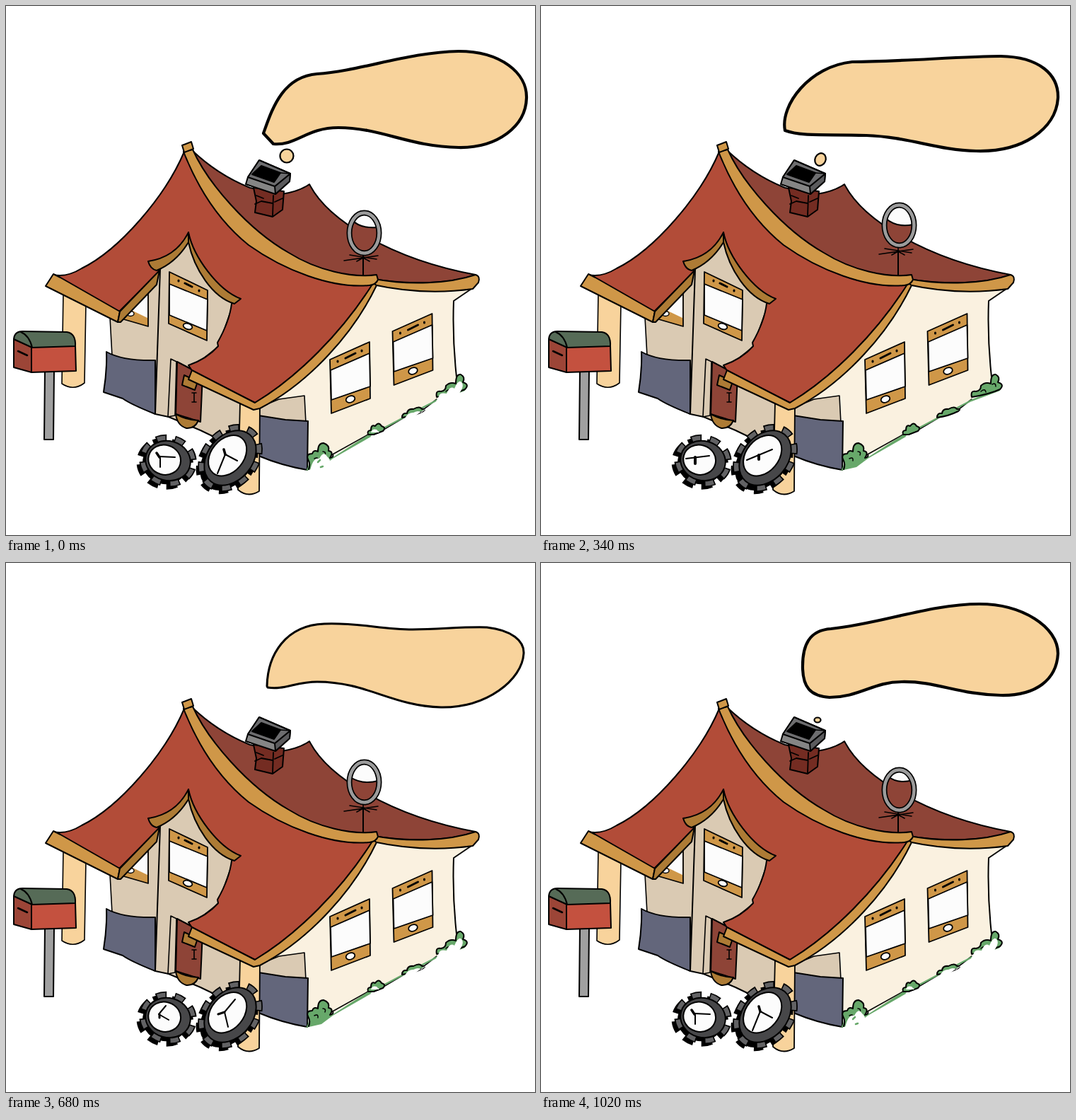
Animation of 748x748 px, one loop 1190 ms. Source, as an HTML page:

```html
<!DOCTYPE html>
<html lang="en">
<head>
<meta charset="utf-8">
<title>Clockwork house</title>
<style>
  html, body { margin: 0; width: 100%; height: 100%; overflow: hidden; background: #fff; }
  svg { display: block; width: 100%; height: 100%; stroke: #000; stroke-width: 2; stroke-linejoin: round; stroke-linecap: round; fill: none; }
  .red { fill: #b24c38; } .dark { fill: #8e4437; } .gold { fill: #cf9748; } .ochre { fill: #ad7b35; }
  .beige { fill: #dacab3; } .cream { fill: #faf1e0; } .blue { fill: #63667b; } .peach { fill: #f8d39c; }
  .white { fill: #fcfcfc; } .bare { stroke: none; }
  .smoke { stroke-width: 4.2; fill: #f8d39c; }
  .puff { fill: #f8d39c; stroke-width: 2.2; }
  .leaf { fill: #67a86a; }
  .hole { fill: #fff; stroke: none; }
  .fringe { stroke: #67a86a; stroke-width: 2.5; }
  .pose { visibility: hidden; animation: show 1190ms step-end infinite; animation-delay: calc((var(--i) - 7) * 170ms); }
  @keyframes show { 0% { visibility: visible; } 14.2857% { visibility: hidden; } }
</style>
</head>
<body>
<svg viewBox="0 0 748 748">
<defs>
  <g id="rimWide">
    <circle cx="506" cy="310" r="28.5" stroke-width="7.5"/>
    <circle cx="506" cy="310" r="28.5" stroke="#9b9b9b" stroke-width="4"/>
  </g>
  <g id="rimThin">
    <ellipse cx="506.5" cy="310" rx="21" ry="28.5" stroke-width="8"/>
    <ellipse cx="506.5" cy="310" rx="21" ry="28.5" stroke="#9b9b9b" stroke-width="4.6"/>
  </g>
  <circle id="discWide" class="dark bare" cx="506" cy="310" r="28"/>
  <ellipse id="discThin" class="dark bare" cx="506.5" cy="310" rx="21" ry="28"/>
  <path id="legs" stroke-width="1.6" d="M478 351L526 344M486 343L524 349M496 352L505 347L514 352M505 341V349"/>

  <g id="hands0">
    <path d="M217 637L239 638M218 637V652M310 634L299 661M310 634L327 643"/>
    <path d="M217 638L213 632M310 634L308 627" stroke-width="3.5"/>
  </g>
  <g id="hands1">
    <path d="M216 638L226 626M216 638L230 646M309 635L324 617M309 635L314 656"/>
    <path d="M217 638V643M309 635L300 638" stroke-width="3"/>
  </g>
  <g id="hands2">
    <path d="M205 640L238 636M291 642L327 627"/>
    <path d="M218 638V647M308 635V641" stroke-width="4"/>
  </g>

  <g id="cornerFull">
    <path class="leaf bare" d="M424 657Q430 648 427 641Q424 633 433 633Q435 627 441 630Q441 618 449 618Q458 621 456 629Q464 630 458 639L464 637L514 605L516 609L462 640L446 652Z"/>
    <path d="M428 655Q431 648 427 641Q424 633 433 633Q435 627 441 630Q441 618 449 618Q458 621 456 629Q464 630 458 639Q464 638 462 634"/>
    <path d="M436 640Q442 637 441 643M448 630Q453 630 451 635" stroke-width="1.5"/>
  </g>
  <g id="cornerBare">
    <use href="#cornerFull"/>
    <path class="hole" d="M430 657Q434 638 443 640Q449 628 454 637Q459 641 458 647L446 660Z"/>
    <path class="fringe" d="M445 652L448 651M441 645L444 642"/>
  </g>
  <g id="restFull">
    <path class="fringe" d="M515 607L562 582L608 558L648 543" stroke-width="4"/>
    <path class="leaf" d="M512 606Q510 600 516 600Q516 591 522 594Q527 587 531 594Q538 596 533 601L520 606ZM560 582Q560 575 567 576Q568 569 576 570Q585 565 588 570Q595 569 590 573Q576 580 560 582Z"/>
    <path class="leaf" d="M609 553Q607 543 615 545Q622 544 622 537Q628 531 636 534Q636 520 643 521Q650 525 646 532Q656 535 649 542Q634 549 609 553Z"/>
    <path d="M622 545Q628 540 629 546M638 535Q643 532 643 538" stroke-width="1.5"/>
  </g>
  <g id="restBare">
    <use href="#restFull"/>
    <path class="hole" d="M612 552Q613 546 623 548Q628 536 634 541Q640 527 644 532Q649 537 640 549L622 560L606 563ZM563 585Q568 574 576 575Q584 571 587 575L591 572L604 562L578 580ZM516 603Q518 597 524 599L528 603Z"/>
  </g>
</defs>

<!-- walls -->
<path class="peach" stroke-width="1.6" d="M81 405L79 534Q95 545 111 533L113 420Z"/>
<path class="beige" stroke-width="1.6" d="M147 440L150 495L211 577L219 370L180 400Z"/>
<path class="blue" d="M142 489Q165 502 211 501L211 577Q176 563 165 555L138 546Q143 515 142 489Z"/>
<path class="beige" d="M218 372L258 328L322 420L300 482L262 512L277 520L331 556V616L300 612L275 600L230 581L211 577Z"/>
<path class="beige" stroke-width="1.6" d="M262 513L233 499L229 581L239 579L241 503"/>
<path class="dark" d="M242 503L278 522L275 588L240 577Z"/>
<path class="ochre" d="M240 577Q257 586 272 586Q267 598 255 597Q242 593 240 577ZM252 522L271 531L267 543L249 536Z"/>
<path d="M266 547V560M263 547H269M263 560H269" stroke-width="1.6"/>
<path class="cream bare" d="M523 392Q590 409 658 400L633 417L637 540L428 655L423 550L357 570Z"/>
<path d="M658 400L633 417Q631 470 637 524"/>
<path class="beige" stroke-width="1.6" d="M357 568L386 556L422 551L424 590H357Z"/>
<path class="blue" d="M357 579L395 585L427 587L426 656Q390 650 357 636Z"/>
<path class="peach" stroke-width="1.8" d="M331 560L328 684Q342 696 358 686L359 560Z"/>
<path d="M460 635L512 606M534 599L561 583M591 570L609 556" stroke-width="1.6"/>

<!-- windows -->
<g stroke-width="1.8">
  <path class="gold" d="M163 442L201 403V453Z"/>
  <path class="white bare" d="M181 424L200 405V441L177 430Z"/>
  <ellipse class="white" cx="176" cy="435" rx="5" ry="3.5" stroke-width="1.4"/>
  <path class="gold" d="M231 376L285 402L284 473L230 449Z"/>
  <path class="white" d="M231 393L285 415L284 459L231 437Z"/>
  <ellipse class="white" cx="257" cy="453" rx="6.5" ry="4" transform="rotate(18 257 453)"/>
  <path d="M244 388V389M253 392L263 397M273 402V403" stroke-width="3"/>
  <g id="pane">
    <path class="gold" d="M458 500L514 475L515 555L460 576Z"/>
    <path class="white" d="M459 515L514 491L515 538L460 557Z"/>
    <ellipse class="white" cx="487" cy="556" rx="6.5" ry="4.5" transform="rotate(-20 487 556)"/>
    <path d="M469 502V503M480 498L494 491M503 487V488" stroke-width="3"/>
  </g>
  <use href="#pane" x="88.500" y="-40"/>
</g>

<!-- back roof -->
<path class="dark" d="M262 203C290 230 320 247 345 257L390 266Q415 262 429 252C455 303 545 358 664 380C630 394 570 393 524 387C410 405 275 320 256 206Z"/>
<path class="gold" d="M521 386C570 395 625 393 664 380Q671 382 668 391L660 400C610 407 560 403 519 394Z"/>
<path d="M505 349V381"/>

<!-- chimney -->
<path fill="#742c22" d="M350 257L393 262L391 288L377 298L352 292L354 276Z"/>
<path d="M377 297L378 268M354 268L364 272M352 280L361 276L377 279M380 277L391 272" stroke-width="1.8"/>
<path fill="#858585" d="M358 218L402 237L401 248L381 266L339 252L342 242Z"/>
<path fill="#5b5b5d" d="M402 237L401 248L381 266L380 255Z"/>
<path fill="#6d6d6f" d="M358 218L402 237L380 255L342 242Z"/>
<path fill="#000" d="M361 226L388 236L379 249L348 238Z"/>
<path d="M388 236L402 237" stroke-width="1.6"/>

<!-- front roof -->
<path class="red" d="M252 206C225 270 160 345 107 371Q86 384 67 380L78 386L160 432L217 375L203 362Q240 355 258 322C265 355 300 402 330 414L319 421Q316 446 299 476L300 481Q284 499 258 508L264 517L352 561C412 525 475 462 520 392C395 400 310 310 252 206Z"/>
<path class="gold" d="M67 379L56 396L158 447L161 432L77 384Z"/>
<path class="ochre" d="M161 432L158 447L162 447L213 394L217 374Z"/>
<path class="ochre" d="M201 361C228 357 247 342 258 320V334C246 354 230 367 213 374Q204 372 201 361Z"/>
<path class="ochre" d="M258 320C265 355 300 402 332 414L323 421C292 412 266 372 258 334Z"/>
<path class="gold" d="M263 515L258 528L350 571L359 569C430 532 492 462 524 395L519 392C475 462 412 525 352 561Z"/>
<path class="gold" d="M264 203C285 250 342 316 400 349C440 374 490 385 524 380L526 387Q523 394 514 395C460 400 392 373 343 338C302 305 273 262 251 206Z"/>
<path class="gold" d="M249 197L262 192L265 202L252 207Z"/>

<!-- mailbox -->
<path fill="#a0a0a0" d="M55 515L54 613H67L68 515Z"/>
<path fill="#c4513f" d="M36 482L98 480L99 516L36 518Z"/>
<path fill="#9c4537" d="M11 471L36 482V518L11 511Z"/>
<path fill="#566b57" d="M11 471Q12 460 23 460L86 461Q99 463 98 481L37 483Z"/>
<path d="M21 461Q33 466 37 483"/>
<path d="M17 488L30 494" stroke-width="2.5"/>

<!-- gears -->
<g transform="translate(229 643) rotate(15)" stroke-linecap="butt">
  <g transform="translate(-3 5)">
    <ellipse rx="31" ry="28" fill="#000"/>
    <ellipse rx="34" ry="30" pathLength="80" stroke-width="13" stroke-dasharray="5.600 4.400" stroke-dashoffset="-.5"/>
  </g>
  <ellipse rx="34" ry="30" pathLength="80" stroke-width="14" stroke-dasharray="5.600 4.400" stroke-dashoffset="-.5"/>
  <ellipse rx="34" ry="30" pathLength="80" stroke="#626264" stroke-width="10.500" stroke-dasharray="4.400 5.600" stroke-dashoffset="-1.100"/>
  <ellipse rx="32" ry="28" fill="#474749"/>
  <ellipse class="white" cx="-5" cy="0" rx="23" ry="21"/>
</g>
<g transform="translate(317 639) rotate(-50)" stroke-linecap="butt">
  <g transform="translate(-7 0)">
    <ellipse rx="44" ry="32" fill="#000"/>
    <ellipse rx="44" ry="33" pathLength="100" stroke-width="12" stroke-dasharray="5 5" stroke-dashoffset="2.500"/>
  </g>
  <ellipse rx="46" ry="34" pathLength="100" stroke-width="13" stroke-dasharray="5.600 4.400" stroke-dashoffset="2.800"/>
  <ellipse rx="46" ry="34" pathLength="100" stroke="#626264" stroke-width="9.500" stroke-dasharray="4.400 5.600" stroke-dashoffset="2.200"/>
  <ellipse rx="43" ry="31.500" fill="#474749"/>
  <ellipse class="white" cx="0" cy="-5" rx="32" ry="23"/>
</g>

<!-- poses -->
<g class="pose" style="--i:0">
  <path class="smoke" d="M364 180C376 147 390 100 440 96C500 92 570 65 640 64C700 64 737 95 736 130C735 170 695 201 640 200C570 199 530 172 470 172C425 172 410 198 378 195Z"/>
  <circle class="puff" cx="397" cy="212" r="9.500"/>
  <use href="#legs" y="9"/><use href="#discThin" y="11"/>
  <path class="white" d="M489 302Q500 315 525 313L518 294H496Z"/>
  <use href="#rimThin" y="11"/><use href="#hands0"/><use href="#cornerBare"/><use href="#restBare"/>
</g>
<g class="pose" style="--i:1">
  <path class="smoke" d="M330 167C333 120 365 70 412 70C460 73 490 84 560 83C620 82 630 79 665 80C710 84 737 108 735 138C733 178 680 206 610 206C530 206 480 190 420 193C395 194 375 195 360 194Q340 192 338 181Z"/>
  <use href="#legs"/><use href="#discWide"/>
  <path class="white" d="M481 299Q500 319 533 314A28 28 0 0 0 481 299Z"/>
  <use href="#rimWide"/><use href="#hands1"/><use href="#cornerFull"/><use href="#restFull"/>
</g>
<g class="pose" style="--i:2">
  <path class="smoke" d="M345 176C338 140 380 85 440 79C500 79 600 71 650 71C705 72 732 97 731 130C728 175 680 207 615 205C560 204 520 185 460 183C400 181 370 185 345 176Z"/>
  <ellipse class="puff" cx="395" cy="217" rx="7.500" ry="9" transform="rotate(25 395 217)"/>
  <use href="#legs"/><use href="#discThin"/>
  <path class="white" d="M487 300Q503 314 526 309L518 284H496Z"/>
  <use href="#rimThin"/><use href="#hands2"/><use href="#cornerFull"/><use href="#restFull"/>
</g>
<g class="pose" style="--i:3">
  <path class="smoke" d="M397 181C407 150 420 100 465 97C530 94 580 67 640 66C690 68 725 100 725 135C722 175 685 202 640 201C575 200 540 172 485 173C440 172 435 195 408 195Z"/>
  <circle class="puff" cx="392" cy="221" r="7"/><circle class="puff" cx="403" cy="203" r="4.500"/>
  <use href="#legs"/><use href="#discWide"/>
  <path class="white" d="M482 297Q495 319 533 315A28 28 0 0 0 482 297Z"/>
  <use href="#rimWide"/><use href="#hands0"/><use href="#cornerBare"/><use href="#restBare"/>
</g>
<g class="pose" style="--i:4">
  <path class="smoke" style="stroke-width:3" d="M369 174C370 130 395 88 450 86C500 84 530 94 575 94C620 93 650 90 680 91C715 95 733 110 732 128C730 165 680 205 615 204C545 202 510 168 440 168C410 168 392 180 370 176Z"/>
  <use href="#legs"/><use href="#discThin"/>
  <path class="white" d="M487 303Q505 314 526 308L518 284H496Z"/>
  <use href="#rimThin"/><use href="#hands1"/><use href="#cornerFull"/><use href="#restBare"/>
</g>
<g class="pose" style="--i:5">
  <path class="smoke" d="M383 170C393 140 405 98 440 94C500 91 560 70 625 67C685 67 720 97 720 133C718 170 680 198 635 197C570 196 530 165 475 166C440 166 425 187 398 186Z"/>
  <circle class="puff" cx="397" cy="212" r="9.500"/><path d="M408 191L410 192"/>
  <use href="#legs"/><use href="#discWide"/>
  <path class="white" d="M482 297Q505 316 533 314A28 28 0 0 0 482 297Z"/>
  <use href="#rimWide"/><use href="#hands2"/><use href="#cornerBare"/><use href="#restFull"/>
</g>
<g class="pose" style="--i:6">
  <path class="smoke" d="M370 150C369 115 380 95 410 93C480 86 550 58 620 58C680 58 731 90 731 128C729 165 700 188 650 187C590 186 560 167 510 168C470 168 450 190 408 190C380 188 371 175 370 150Z"/>
  <ellipse class="puff" cx="391" cy="222" rx="4.500" ry="3.500"/>
  <use href="#legs" y="9"/><use href="#discThin" y="11"/>
  <path class="white" d="M489 301Q505 313 525 307L518 294H496Z"/>
  <use href="#rimThin" y="11"/><use href="#hands0"/><use href="#cornerBare"/><use href="#restBare"/>
</g>
</svg>
</body>
</html>
```
